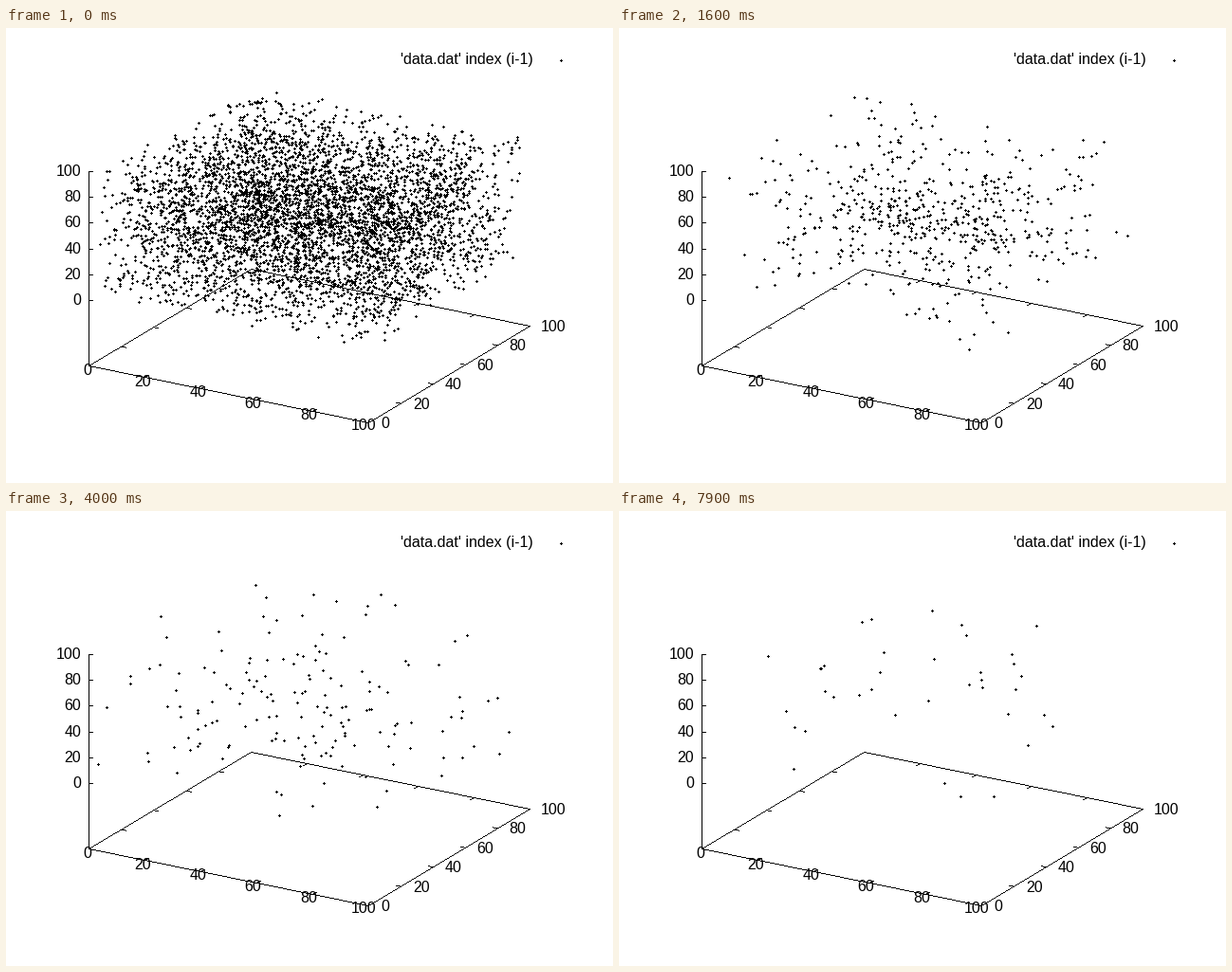
Write a matplotlib script that moves like this. It is 640 px wide and 480 px high and loops after 8 s.

```python
import numpy as np
import matplotlib.pyplot as plt
from matplotlib.animation import FuncAnimation
from matplotlib.path import Path

FRAMES, STEP = 80, 100
PT = 0.9            # points per pixel at 80 dpi
MEET = 0.9          # seconds until the streams are tightest
N = 5000

plt.rcParams["font.family"] = "Liberation Sans"
fig = plt.figure(figsize=(8, 6), dpi=80, facecolor="white")
ax = fig.add_axes([0, 0, 1, 1])
ax.set(xlim=(0, 640), ylim=(480, 0))
ax.axis("off")


def project(x, y, z):
    """Box coordinates (0..100) to stage pixels."""
    return 88 + 2.94 * x + 1.70 * y, 288 + 0.60 * x - 1.02 * y - 1.36 * z


def line(x0, y0, x1, y1):
    """Hard line, one pixel wide."""
    n = int(max(abs(x1 - x0), abs(y1 - y0))) + 1
    ax.plot(np.round(np.linspace(x0, x1, n)), np.round(np.linspace(y0, y1, n)),
            ls="", marker=",", color="black", antialiased=False)


def tick(x, y, dx, dy):
    line(x, y, x + dx, y + dy)


def label(x, y, s, ha):
    ax.text(x, y, s, ha=ha, va="baseline", fontsize=16 * PT, color="black")


def draw_axes():
    corners = [(87, 357), (382, 417), (552, 315), (258, 255)]
    for a, b in zip(corners, corners[1:] + corners[:1]):
        line(*a, *b)
    line(87, 357, 87, 152)
    for i in range(6):
        s = str(20 * i)
        f = i / 5
        tick(87, 288 - 136 * f, 4, 0)
        label(79, 292 - 136 * f, s, "right")
        tick(87 + 295 * f, 357 + 60 * f, 4, -2.4)
        tick(258 + 294 * f, 255 + 60 * f, -4, 2.4)
        label(85.5 + 291.5 * f, 366 + 58.5 * f, s, "center")
        tick(87 + 171 * f, 357 - 102 * f, 5, 1)
        tick(382 + 170 * f, 417 - 102 * f, -5, -1)
        label(395.5 + 168 * f, 422 - 102 * f, s, "left")
    label(555.5, 38, "'data.dat' index (i-1)", "right")


# One-pixel-wide plus, three pixels across
quarter = [(1, 3), (1, 1), (3, 1)]
outline = (quarter + [(x, -y) for x, y in quarter[::-1]]
           + [(-x, -y) for x, y in quarter]
           + [(-x, y) for x, y in quarter[::-1]])
plus = Path(np.array(outline + outline[:1]) / 3, closed=True)


def dots():
    return ax.plot([], [], ls="", marker=plus, ms=3 * PT, mew=0,
                   color="black", antialiased=False)[0]


# Particles stream along the box diagonals, and some into a flat core
rng = np.random.default_rng(12)
start = rng.uniform(2, 98, (N, 3))
octant = np.where(start < 50, -25, 25)
stream = 50 + octant * rng.normal(0.85, 0.4, (N, 1))
core = rng.normal((57, 50, 50), (9, 2.5, 2.5), (N, 3))
in_core = rng.random((N, 1)) < 0.22
goal = np.where(in_core, core, stream)
keep = np.where(in_core, 0.03, 0.9) * rng.random((N, 1))
speed = (goal - start) * (1 - keep) / MEET
speed += rng.normal(0, 5, (N, 3)) * ~in_core


def alive(t):
    times = [0, 0.9, 1.6, 3.2, 4.8, 6.4, 7.9]
    counts = [N, 3700, 590, 222, 115, 62, 38]
    return round(np.exp(np.interp(t, times, np.log(counts))))


def positions(t):
    n = alive(t)
    p = start[:n] + speed[:n] * t
    return 100 - np.abs(100 - p % 200)      # bounce off the walls


draw_axes()
key = dots()
key.set_data([585], [34])
cloud = dots()


def update(i):
    x, y = project(*positions(i * STEP / 1000).T)
    cloud.set_data(np.round(x), np.round(y))
    return [cloud]


anim = FuncAnimation(fig, update, frames=FRAMES, interval=STEP,
                     repeat=True, repeat_delay=0)
plt.show()
```
